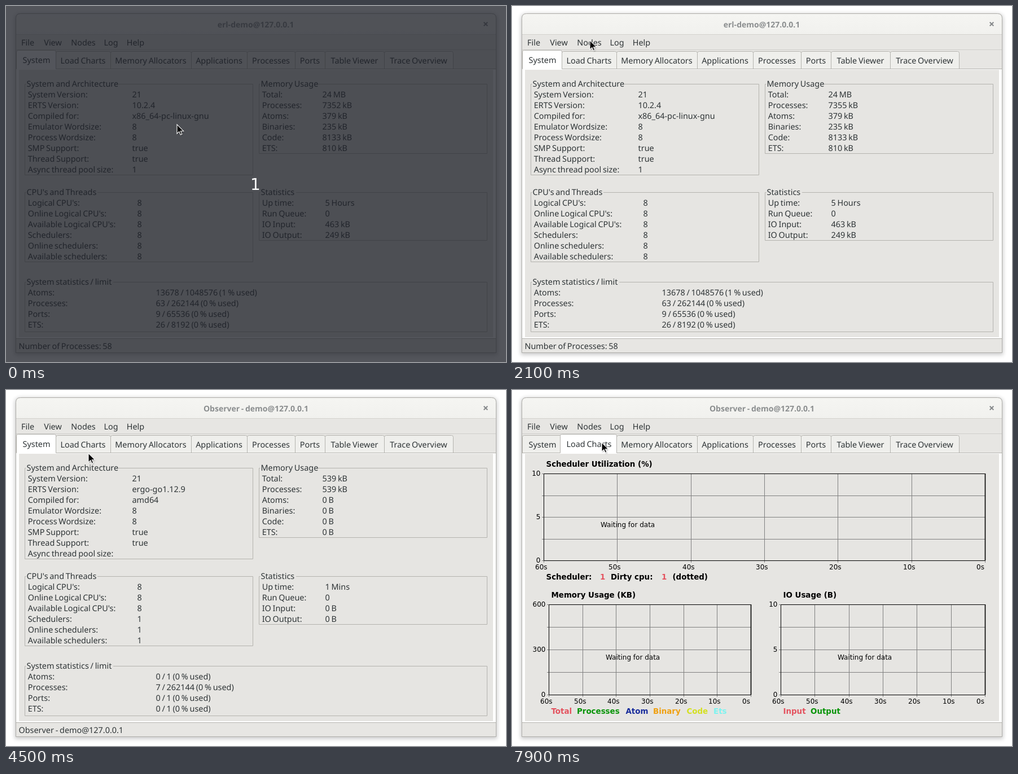
An HTML page that plays this animation: 886 by 631 pixels, repeating every 8 s.

```html
<!DOCTYPE html>
<html lang="en">
<head>
<meta charset="utf-8">
<title>Observer</title>
<style>
  html, body { margin: 0; width: 100%; height: 100%; overflow: hidden; background: #fff; }
  svg { display: block; width: 886px; height: 631px; }
  text {
    font: 14.4px "Noto Sans", "Open Sans", sans-serif; word-spacing: -1px;
    text-rendering: geometricPrecision; fill: #2e3436; white-space: pre;
  }
  .mid { text-anchor: middle; }
  .end { text-anchor: end; }
  .title { font-size: 14px; font-weight: 700; fill: #8b8e8f; }
  .blue { fill: #3a83cf; }
  .white { fill: #fff; }
  .plot, .bold, .count { font: 12px "DejaVu Sans", sans-serif; fill: #000; word-spacing: 0; text-rendering: auto; }
  .bold { font-size: 13.4px; font-weight: 700; }
  .count { font-size: 28px; fill: #fff; }
</style>
</head>
<body>
<svg id="stage" viewBox="0 0 886 631">
  <defs>
    <linearGradient id="bar" x2="0" y2="1">
      <stop stop-color="#f5f5f2"/><stop offset="1" stop-color="#f1f1ee"/>
    </linearGradient>
    <filter id="soft" x="-10%" y="-10%" width="120%" height="120%"><feGaussianBlur stdDeviation="3.5"/></filter>
    <filter id="near" x="-30%" y="-30%" width="170%" height="170%"><feGaussianBlur stdDeviation="1.2"/></filter>
  </defs>
</svg>
<script>
const LOOP = 8000, STEP = 100;
const MENU_HOT = 2200, MENU_OPEN = 2300, ITEM_HOT = 3000, MENU_CLOSE = 3900;
const SWITCH = 4000, CHARTS = 6900, PLOTS = 7300, RESCALE = 7900;
const PANEL = '#e6e5e2', LINE = '#b4b3ae', HOT = '#4e92d4';

// Pointer tip: time, x, y
const path = [
  [0, 303, 210], [700, 303, 210], [1000, 266, 209], [1100, 266, 209],
  [1500, 187, 163], [1600, 187, 163], [1900, 138, 75], [2000, 138, 75],
  [2100, 138, 61], [2800, 138, 61], [3100, 153, 84], [3200, 153, 84],
  [3300, 145, 87], [3400, 145, 87], [3500, 140, 88], [3800, 140, 88],
  [3900, 140, 90], [4400, 140, 90], [4500, 146, 112], [4700, 217, 170],
  [4800, 217, 170], [5200, 251, 183], [5300, 251, 183], [5600, 292, 185],
  [5800, 292, 185], [6100, 202, 179], [6200, 202, 179], [6700, 159, 93], [LOOP, 159, 93]
];

const text = (x, y, s, cls = '', fill = '') =>
  `<text x="${x}" y="${y}" class="${cls}"${fill && ` style="fill:${fill}"`}>${s}</text>`;
const rect = (x, y, w, h, fill, more = '') =>
  `<rect x="${x}" y="${y}" width="${w}" height="${h}" fill="${fill}" ${more}/>`;
const line = (d, stroke, w = 1) => `<path d="${d}" fill="none" stroke="${stroke}" stroke-width="${w}"/>`;
const during = (from, to, body) => `<g data-from="${from}" data-to="${to}">${body}</g>`;

const windowFrame = () => {
  const shape = 'M17.5 614.5V21.5q0-8 8-8H860.5q8 0 8 8V614.5Z';
  return rect(0, 0, 886, 631, '#fff') +
    `<path d="${shape}" transform="translate(0 2)" stroke="#000" stroke-width="4" opacity=".2" filter="url(#soft)"/>` +
    `<path d="${shape}" fill="#e7e6e3"/>` +
    '<path d="M18 50V22q0-8 8-8H860q8 0 8 8V50Z" fill="url(#bar)"/>' +
    line('M18 50.5H868', '#d3d2ce') + line('M18 77.5H868', '#cfcecb') +
    rect(18, 112, 850, 477, '#fff') + rect(23, 113, 840, 474, PANEL) +
    line('M18 589.5H868', LINE) + line(shape, '#adaca8') +
    line('M846.7 28.7l6.6 6.6m0-6.6l-6.6 6.6', '#85888a', 2);
};

const menuBar = () =>
  [['File', 38.5], ['View', 83], ['Log', 186], ['Help', 229.5]].map(([s, x]) => text(x, 70, s, 'mid')).join('') +
  during(0, MENU_HOT, text(137, 70, 'Nodes', 'mid')) +
  during(MENU_HOT, MENU_CLOSE, text(137, 70, 'Nodes', 'mid blue') + rect(108, 75, 58, 3, HOT)) +
  during(MENU_CLOSE, LOOP, text(137, 70, 'Nodes', 'mid'));

// Label, left edge, right edge, text centre
const tabs = [
  ['System', 18, 88, 54], ['Load Charts', 88, 185, 136.5], ['Memory Allocators', 185, 328, 256.5],
  ['Applications', 328, 427, 377.5], ['Processes', 427, 512, 469.5], ['Ports', 512, 565, 538.5],
  ['Table Viewer', 565, 670, 617.5], ['Trace Overview', 670, 792, 731]
];
const tab = ([label, l, r, mid], active) => {
  const top = active ? 78.5 : 80.5, left = l + .5 - (active && l > 18 ? 3 : 0);
  const shape = `M${left} ${active ? 113 : 111}V${top + 3}q0-3 3-3H${r - 2.5}q3 0 3 3V${active ? 113 : 111}`;
  return `<path d="${shape}" fill="${active ? '#fff' : '#efefec'}"/>` +
    line(shape.replace(/113/g, '111.5'), LINE) + text(mid, active ? 101 : 102, label, 'mid');
};
const tabBar = active => line('M18 111.5H868', LINE) +
  tabs.map((t, i) => i === active ? '' : tab(t, false)).join('') + tab(tabs[active], true);

// Box, end of heading, value column, rows of [label, first value, later value]
const groups = [
  [33.5, 138.5, 437.5, 299.5, 199, 223.5, 'System and Architecture', [
    ['System Version:', '21', '21'], ['ERTS Version:', '10.2.4', 'ergo-go1.12.9'],
    ['Compiled for:', 'x86_64-pc-linux-gnu', 'amd64'], ['Emulator Wordsize:', 8, 8],
    ['Process Wordsize:', 8, 8], ['SMP Support:', true, true], ['Thread Support:', true, true],
    ['Async thread pool size:', 1, '']]],
  [448.5, 138.5, 852.5, 261.5, 552, 560.5, 'Memory Usage', [
    ['Total:', '24 MB', '539 kB'], ['Processes:', ['7352 kB', '7355 kB'], '539 kB'],
    ['Atoms:', '379 kB', '0 B'], ['Binaries:', '235 kB', '0 B'],
    ['Code:', '8133 kB', '0 B'], ['ETS:', '810 kB', '0 B']]],
  [33.5, 330.5, 437.5, 453.5, 162, 232.5, "CPU's and Threads", [
    ["Logical CPU's:", 8, 8], ["Online Logical CPU's:", 8, 8], ["Available Logical CPU's:", 8, 8],
    ['Schedulers:', 8, 1], ['Online schedulers:', 8, 1], ['Available schedulers:', 8, 1]]],
  [448.5, 330.5, 852.5, 415.5, 514, 565.5, 'Statistics', [
    ['Up time:', '5 Hours', '1 Mins'], ['Run Queue:', 0, 0],
    ['IO Input:', '463 kB', '0 B'], ['IO Output:', '249 kB', '0 B']]],
  [33.5, 489.5, 852.5, 577.5, 190, 265.5, 'System statistics / limit', [
    ['Atoms:', '13678 / 1048576 (1 % used)', '0 / 1 (0 % used)'],
    ['Processes:', '63 / 262144 (0 % used)', '7 / 262144 (0 % used)'],
    ['Ports:', '9 / 65536 (0 % used)', '0 / 1 (0 % used)'],
    ['ETS:', '26 / 8192 (0 % used)', '0 / 1 (0 % used)']]]
];
const group = ([l, t, r, b, gap, col, heading, rows]) =>
  line(`M${gap} ${t}H${r}V${b}H${l}V${t}H${l + 2}`, LINE) + text(l + 3, t + 4.5, heading) +
  rows.map(([label, before, after], i) => {
    const y = t + 23.5 + 19 * i;
    const first = Array.isArray(before)
      ? during(0, 1800, text(col, y, before[0])) + during(1800, SWITCH, text(col, y, before[1]))
      : during(0, SWITCH, text(col, y, before));
    return text(l + 5.2, y, label) + first + during(SWITCH, CHARTS, text(col, y, after));
  }).join('');

const popup = () => {
  const item = (y, s, cls) => text(136.5, y, s, cls);
  return during(MENU_OPEN, MENU_CLOSE,
    rect(24.5, 81.5, 57, 27, 'none', 'stroke="#c4c3c0" stroke-dasharray="1 1"') +
    rect(108, 81, 195, 83, '#000', 'opacity=".2" filter="url(#near)"') +
    rect(107.5, 79.5, 196, 84, '#fdfdfc', 'stroke="#cfceca"') +
    item(126, 'erl-demo@127.0.0.1') + item(153, 'Connect Node')) +
    during(MENU_OPEN, ITEM_HOT, item(99, 'demo@127.0.0.1')) +
    during(ITEM_HOT, MENU_CLOSE, rect(108, 80, 195, 27, HOT) + item(99, 'demo@127.0.0.1', 'white'));
};

const chart = (l, t, r, b, title, max, legend) => {
  const h = b - t, step = (r - l) / 6;
  let out = text(l + 4.5, t - 12, title, 'bold');
  for (let i = 0; i < 5; i++) {
    const y = Math.round(t + h * i / 4) + .5;
    out += line(`M${l - 3} ${y}H${r}`, '#808080');
  }
  for (let i = 0; i < 7; i++) {
    const x = Math.round(l + step * i) + .5;
    out += line(`M${x} ${t}V${b + 4}`, '#808080') + text(x - 15.5, b + 16, `${60 - 10 * i}s`, 'plot');
  }
  [max, max / 2, 0].forEach((v, i) => out += text(l - 5.5, t + h * i / 2 + 4, v, 'plot end'));
  out += line(`M${l + .5} ${t + .5}H${r + .5}V${b + .5}H${l + .5}Z`, '#000') + line(`M${r + .5} ${t}V${b}`, '#000', 1.6);
  out += text(l + 101, t + h / 2 + 18, 'Waiting for data', 'plot');
  return out + legend.map(([dx, s, fill]) => text(l + dx, b + 34, s, 'bold', fill)).join('');
};
const RED = '#e4525e', GREEN = '#089408';
const memoryChart = (left, max) => chart(left, 380, 423, 540, 'Memory Usage (KB)', max, [
  [4.5, 'Total', RED], [50, 'Processes', GREEN], [136.5, 'Atom', '#192d9c'],
  [185, 'Binary', '#f0a010'], [244.5, 'Code', '#d4e020'], [292, 'Ets', '#7cf4f0']]);
const charts = () =>
  chart(56, 148, 838, 302, 'Scheduler Utilization (%)', 10, [
    [4.5, 'Scheduler:', ''], [100, '1', RED], [119, 'Dirty cpu:', ''], [209, '1', RED], [228.5, '(dotted)', '']]) +
  during(PLOTS, RESCALE, memoryChart(56, 10)) + during(RESCALE, LOOP, memoryChart(65, 600)) +
  chart(476, 380, 838, 540, 'IO Usage (B)', 10, [[4.5, 'Input', RED], [53, 'Output', GREEN]]);

const arrow = 'M0 0V16.2L3.8 12.7 6.3 18.3 8.8 17.2 6.4 11.7H11.6Z';

const stage = document.getElementById('stage');
stage.insertAdjacentHTML('beforeend',
  windowFrame() + menuBar() +
  during(0, SWITCH, text(442.5, 38, 'erl-demo@127.0.0.1', 'mid title')) +
  during(SWITCH, LOOP, text(443, 38, 'Observer - demo@127.0.0.1', 'mid title')) +
  during(0, ITEM_HOT, text(22.5, 608, 'Number of Processes: 58')) +
  during(SWITCH, CHARTS, text(22.5, 608, 'Observer - demo@127.0.0.1')) +
  during(0, CHARTS, tabBar(0) + groups.map(group).join('')) +
  during(CHARTS, LOOP, tabBar(1)) + during(PLOTS, LOOP, charts()) + popup() +
  during(0, 400, rect(0, 0, 886, 631, 'rgb(30,32,40)', 'opacity=".76"') + text(442, 326, '1', 'mid count')) +
  `<g id="pointer"><path d="${arrow}" transform="translate(1 1.5)" opacity=".35" filter="url(#near)"/>` +
  `<path d="${arrow}" stroke="#fff" stroke-width="1.1"/></g>`);

const timed = [...stage.querySelectorAll('[data-from]')];
const pointer = document.getElementById('pointer');

function pointerAt(t) {
  const i = path.findIndex(k => k[0] > t);
  const [t0, x0, y0] = path[i - 1], [t1, x1, y1] = path[i];
  const p = (t - t0) / (t1 - t0);
  return [x0 + (x1 - x0) * p, y0 + (y1 - y0) * p].map(Math.round);
}

function draw(now) {
  const t = Math.max(0, now - start) % LOOP;
  for (const el of timed) {
    el.style.display = t >= +el.dataset.from && t < +el.dataset.to ? '' : 'none';
  }
  pointer.setAttribute('transform', `translate(${pointerAt(Math.floor(t / STEP) * STEP)})`);
  requestAnimationFrame(draw);
}
const start = performance.now();
draw(start);
</script>
</body>
</html>
```
